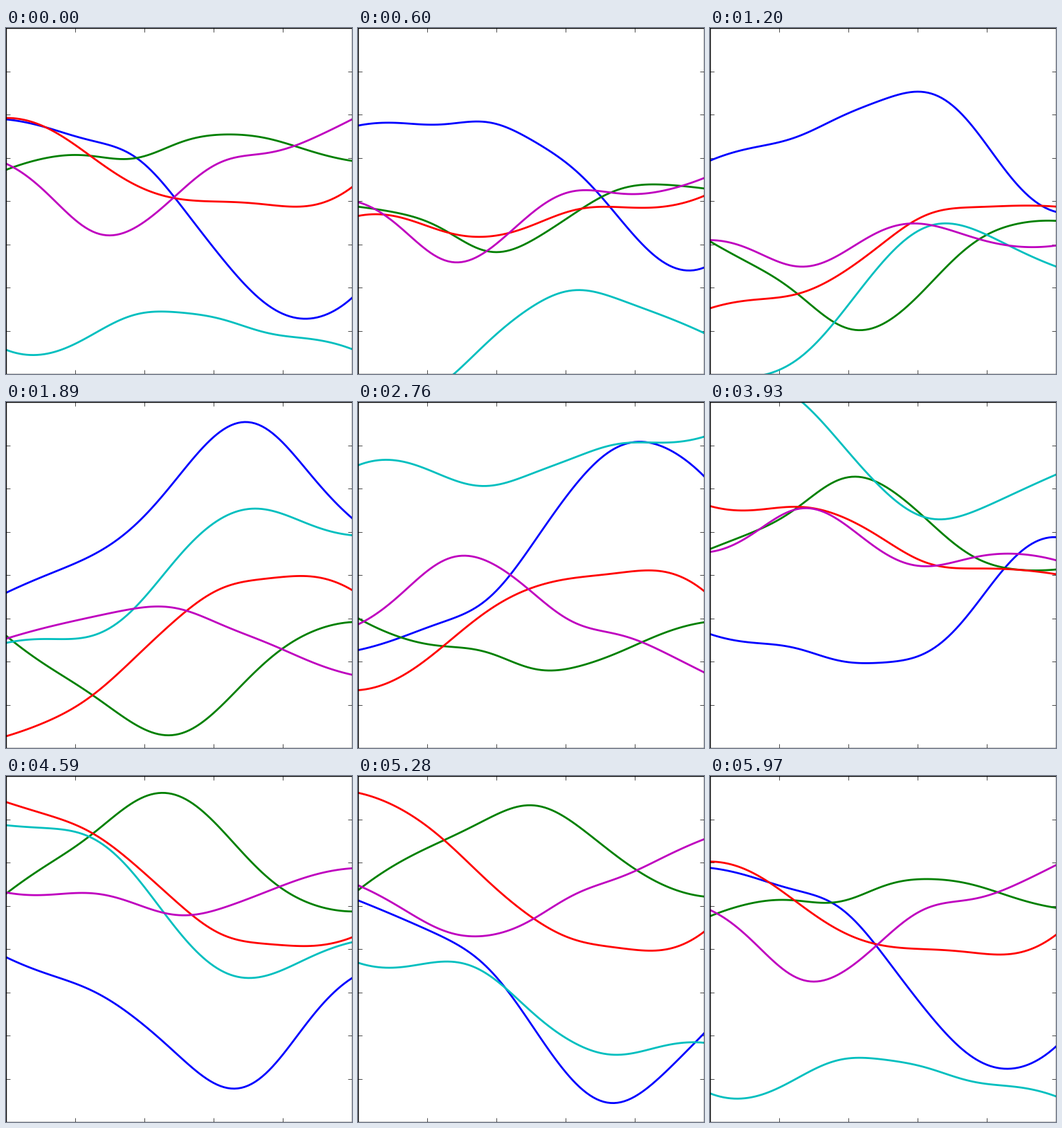
Write a matplotlib script that moves like this. It is 500 px wide and 500 px high and loops after 6000 ms.

```python
import numpy as np
import matplotlib.pyplot as plt
from matplotlib.animation import FuncAnimation

SIZE, DPI = 500, 100
FRAMES, INTERVAL = 200, 30
HALF = SIZE / 2

# Every point of a curve swings as Re(z * exp(-it)), in pixels below the middle.
# Each row gives z at nine evenly spaced places from left to right.
CURVES = {
    "blue": [-118-23j, -105-47j, -87-69j, -63-107j, 3-155j, 83-192j, 148-167j, 170-88j, 140-29j],
    "green": [-45+76j, -63+118j, -65+161j, -62+209j, -84+214j, -96+163j, -91+98j, -73+60j, -58+49j],
    "red": [-120+202j, -104+184j, -63+162j, -23+119j, -3+65j, 1+21j, 5+8j, 7+5j, -20+15j],
    "cyan": [215+200j, 220+196j, 193+179j, 164+121j, 161+40j, 171-16j, 190-21j, 199+6j, 214+30j],
    "magenta": [-54+77j, -8+78j, 44+85j, 38+69j, -12+48j, -57+54j, -69+76j, -88+97j, -118+106j],
}
COLORS = {"blue": (0, 0, 1), "green": (0, 0.5, 0), "red": (1, 0, 0),
          "cyan": (0, 0.75, 0.75), "magenta": (0.75, 0, 0.75)}


def smooth(keys, count=101):
    """Natural quintic spline through evenly spaced keys."""
    n = len(keys)
    knots = np.arange(n)
    x = np.linspace(0, n - 1, count)

    def terms(p):
        return np.hstack([np.abs(p[:, None] - knots) ** 5.0, np.vander(p, 3)])

    powers = np.vander(knots, 3)
    system = np.vstack([terms(knots), np.hstack([powers.T, np.zeros((3, 3))])])
    return terms(x) @ np.linalg.solve(system, np.append(keys, np.zeros(3)))


fig = plt.figure(figsize=(SIZE / DPI, SIZE / DPI), dpi=DPI, facecolor="white")
ax = fig.add_axes([0, 0, 1, 1])
ax.set_xlim(0, SIZE)
ax.set_ylim(HALF, -HALF)
ax.set_xticks(np.linspace(0, SIZE, 6))
ax.set_yticks(np.linspace(-HALF, HALF, 9))
ax.tick_params(direction="in", length=4, width=0.5, top=True, right=True,
               labelbottom=False, labelleft=False)
for spine in ax.spines.values():
    spine.set_linewidth(1)

waves = [smooth(keys) for keys in CURVES.values()]
xs = np.linspace(0, SIZE, len(waves[0]))
lines = [ax.plot(xs, wave.real, color=COLORS[name], lw=2)[0]
         for name, wave in zip(CURVES, waves)]


def update(i):
    turn = np.exp(-2j * np.pi * i / FRAMES)
    for line, wave in zip(lines, waves):
        line.set_ydata((wave * turn).real)
    return lines


anim = FuncAnimation(fig, update, frames=FRAMES, interval=INTERVAL,
                     repeat=True, repeat_delay=0)
plt.show()
```
